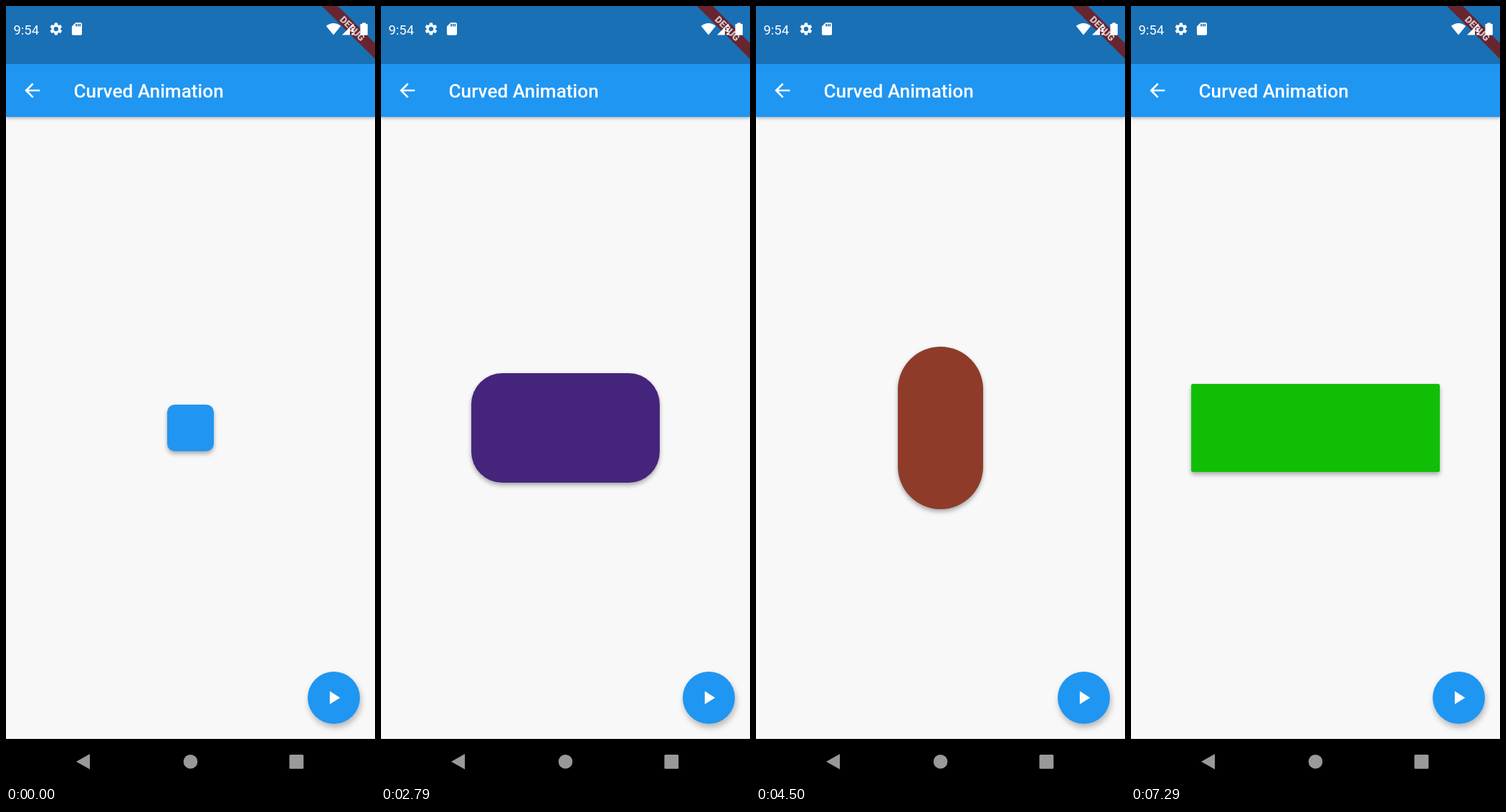
An HTML page for the animation above (7.33 s loop, 515 by 1087 pixels).

```html
<!DOCTYPE html>
<html lang="en">
<head>
<meta charset="utf-8">
<title>Curved Animation</title>
<style>
html, body { margin: 0; width: 100%; height: 100%; overflow: hidden; background: #f8f8f9; }
#stage { position: relative; width: 515px; height: 1087px; overflow: hidden; background: #f8f8f9; }
#bar { position: absolute; width: 515px; height: 154.5px; background: #1f96f2; box-shadow: 0 2px 4px rgba(0,0,0,.28); }
svg { position: absolute; left: 0; top: 0; font-family: Roboto, sans-serif; }
#box { position: absolute; box-shadow: 0 4px 6px rgba(0,0,0,.27), 0 1px 4px rgba(0,0,0,.1); }
#fab { position: absolute; left: 420.5px; top: 929.7px; width: 73.4px; height: 73.4px; border-radius: 50%; background: #1f96f2; }
#ink { position: absolute; inset: 0; border-radius: 50%; overflow: hidden; }
#glow, #splash { position: absolute; }
#glow { inset: 0; background: #bcbcbc; }
#splash { border-radius: 50%; background: #c8c8c8; }
</style>
</head>
<body>
<div id="stage">
  <div id="bar"></div>
  <div id="box"></div>
  <div id="fab"><div id="ink"><div id="glow"></div><div id="splash"></div></div></div>
  <svg width="515" height="1087" fill="#fff">
    <rect width="515" height="81" fill="#1a70b5"/>
    <g transform="translate(515 0) rotate(45)">
      <rect x="-52.4" y="36.7" width="104.8" height="15.7" fill="#672530"/>
      <text y="49.3" font-size="13.4" font-weight="900" text-anchor="middle" fill="#d2c4c9">DEBUG</text>
    </g>
    <text x="10.5" y="39.5" font-size="18.4">9:54</text>
    <path transform="translate(59.3 21.5) scale(.88)" d="M19.14 12.94c.04-.3.06-.61.06-.94s-.02-.64-.07-.94l2.03-1.58c.18-.14.23-.41.12-.61l-1.92-3.32c-.12-.22-.37-.29-.59-.22l-2.39.96c-.5-.38-1.03-.7-1.62-.94l-.36-2.54c-.04-.24-.24-.41-.48-.41h-3.84c-.24 0-.43.17-.47.41l-.36 2.54c-.59.24-1.13.57-1.62.94l-2.39-.96c-.22-.08-.47 0-.59.22L2.74 8.87c-.12.21-.08.47.12.61l2.03 1.58c-.05.3-.09.63-.09.94s.02.64.07.94l-2.03 1.58c-.18.14-.23.41-.12.61l1.92 3.32c.12.22.37.29.59.22l2.39-.96c.5.38 1.03.7 1.62.94l.36 2.54c.05.24.24.41.48.41h3.84c.24 0 .44-.17.47-.41l.36-2.54c.59-.24 1.13-.56 1.62-.94l2.39.96c.22.08.47 0 .59-.22l1.92-3.32c.12-.22.07-.47-.12-.61zM12 15.6a3.6 3.6 0 1 1 0-7.2 3.6 3.6 0 0 1 0 7.2z"/>
    <path transform="translate(88.4 21.5) scale(.88)" d="M18 2h-8L4 8v12a2 2 0 0 0 2 2h12a2 2 0 0 0 2-2V4a2 2 0 0 0-2-2zm-6 6h-2V4h2zm3 0h-2V4h2zm3 0h-2V4h2z"/>
    <path d="M457 40.5 446.8 28Q457 19.8 467.2 28Z"/>
    <path d="M469 40.5 485.2 24.2V29H480V40.5ZM482.3 31H485.2V36.5H482.3ZM482.3 38H485.2V40.5H482.3Z"/>
    <path d="M497.2 23.4H502V25H503.6Q504.8 25 504.8 26.2V39.6Q504.8 40.8 503.6 40.8H495.6Q494.4 40.8 494.4 39.6V26.2Q494.4 25 495.6 25H497.2Z"/>
    <path transform="translate(21 102.3) scale(1.311)" d="M20 11H7.83l5.59-5.59L12 4l-8 8 8 8 1.41-1.41L7.83 13H20z"/>
    <text x="94.5" y="128" font-size="26.2" font-weight="500">Curved Animation</text>
    <path transform="translate(441.4 950.7) scale(1.311)" d="M8 5v14l11-7z"/>
    <rect y="1024" width="515" height="63" fill="#000"/>
    <g fill="#999">
      <path d="M98 1055.7 117 1045V1066.4Z"/>
      <circle cx="257.5" cy="1055.7" r="9.8"/>
      <rect x="395.5" y="1046" width="19.8" height="19.8" rx="1.5"/>
    </g>
  </svg>
</div>
<script>
const LOOP = 7330, MORPH = 1000, HOLD = 120, FAB = 36.7;
const $ = id => document.getElementById(id);
const clamp = x => Math.max(0, Math.min(1, x));
const mix = (a, b, k) => a + (b - a) * k;

// width, height, corner radius, r, g, b
const first = [65.6, 65.6, 10.5, 32, 150, 242];
// release time of each tap and the shape it leads to
const taps = [
  [1180, [265, 179, 65.5, 165, 25, 92]],
  [2080, [262, 151, 42, 63, 38, 126]],
  [3450, [119, 227, 60, 142, 60, 41]],
  [4850, [363, 67, 34, 131, 134, 44]],
  [6175, [347, 123, 2.5, 16, 191, 5]]
];

// cubic-bezier(.4, 0, .2, 1)
function ease(x) {
  if (x <= 0 || x >= 1) return clamp(x);
  const curve = (s, a, b) => 3 * a * s * (1 - s) ** 2 + 3 * b * s * s * (1 - s) + s ** 3;
  let lo = 0, hi = 1;
  for (let i = 0; i < 20; i++) {
    const m = (lo + hi) / 2;
    if (curve(m, .4, .2) < x) lo = m; else hi = m;
  }
  return curve(lo, 0, 1);
}

function drawBox(t) {
  let pose = first;
  for (const [up, goal] of taps) {
    const k = ease((t - up) / MORPH);
    pose = pose.map((v, i) => mix(v, goal[i], k));
  }
  const [w, h, r, ...rgb] = pose;
  Object.assign($("box").style, {
    left: 257.5 - w / 2 + "px", top: 589.5 - h / 2 + "px",
    width: w + "px", height: h + "px", borderRadius: r + "px",
    background: `rgb(${rgb.map(Math.round)})`
  });
}

function drawFab(t) {
  const tap = taps.find(([up]) => t >= up - HOLD && t < up + 400);
  const after = tap ? t - tap[0] : 1e4;
  const held = clamp((after + HOLD) / HOLD);
  const lift = clamp((after + HOLD) / 100) * (1 - ease((after - 40) / 240));
  const glow = after < 0 ? (after + HOLD) / 200 : HOLD / 200 - after / 200;
  const r = 38 * held, y = mix(FAB + 28, FAB, held);
  $("glow").style.opacity = .4 * clamp(glow);
  Object.assign($("splash").style, {
    left: FAB - r + "px", top: y - r + "px",
    width: 2 * r + "px", height: 2 * r + "px",
    opacity: .4 * clamp(1 - after / 200)
  });
  $("fab").style.boxShadow =
    `${mix(1.5, 3, lift)}px ${mix(5, 9, lift)}px ${mix(8, 13, lift)}px rgba(0,0,0,${mix(.27, .33, lift)})`;
}

function draw() {
  const t = performance.now() % LOOP;
  drawBox(t);
  drawFab(t);
  requestAnimationFrame(draw);
}
draw();
</script>
</body>
</html>
```
